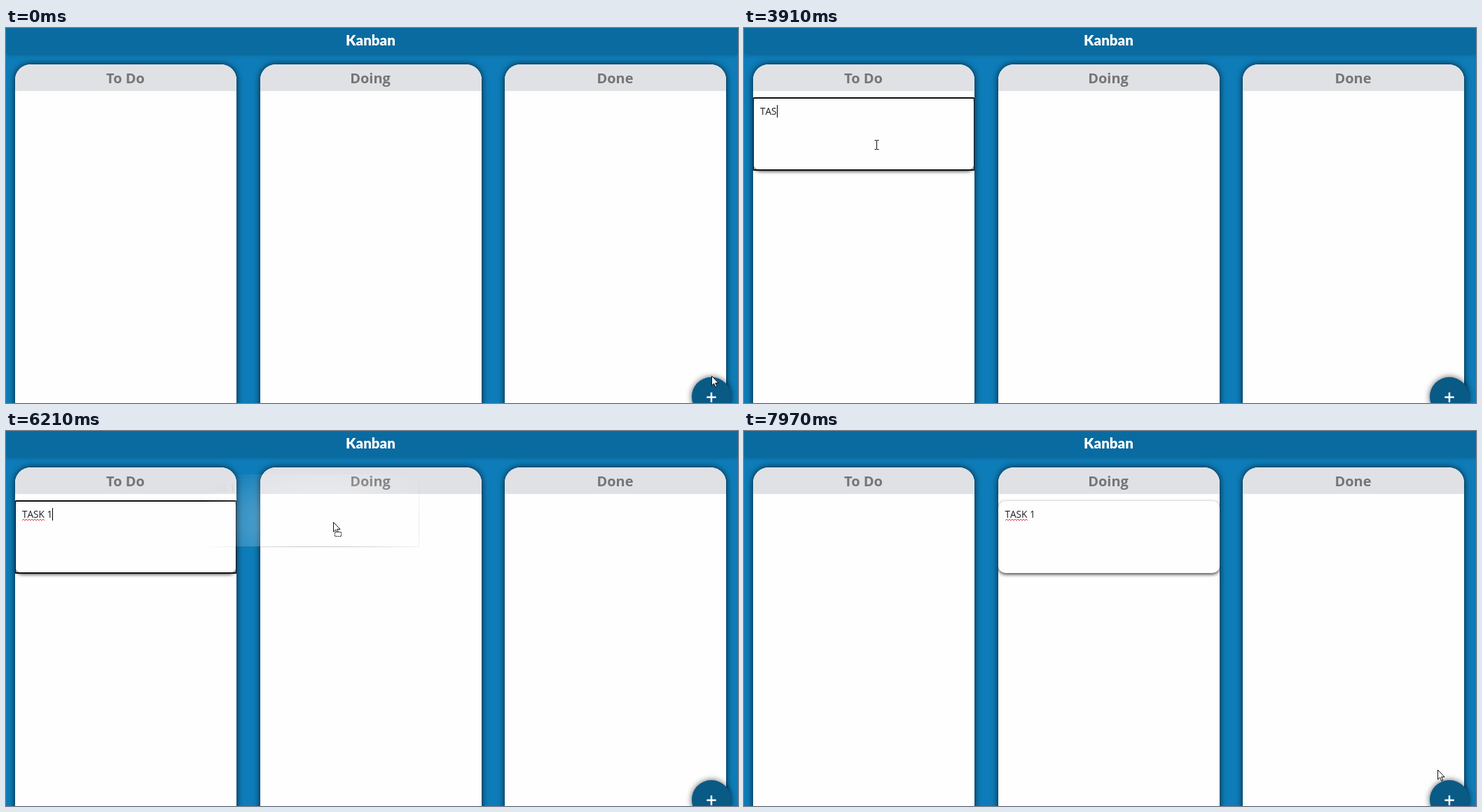
Write an HTML page that moves like this. It is 1045 px wide and 536 px high and loops after 8 s.

```html
<!DOCTYPE html>
<html lang="en">
<head>
<meta charset="utf-8">
<title>Kanban</title>
<style>
html, body { margin: 0; width: 100%; height: 100%; overflow: hidden; background: #0e7cb8; }
body { position: relative; font-family: "Open Sans", "Noto Sans", sans-serif; }
header, section, .card, .add, #ghost, svg { position: absolute; box-sizing: border-box; }
header {
  left: 0; top: 0; width: 1045px; height: 37px; background: #0a6ba0; color: #fff;
  font: 900 20.5px/35px Lato, sans-serif; text-align: center; text-indent: -4px;
  box-shadow: 0 1px 6px rgba(0, 0, 0, .25);
}
section {
  top: 52px; width: 316px; height: 500px; overflow: hidden; background: #fefefe;
  border-radius: 22px 22px 0 0; box-shadow: 0 0 10px rgba(0, 0, 0, .8);
}
h2 {
  margin: 0; height: 38px; background: #e0e1e5; color: #757577;
  font: 700 20px/40px "Open Sans", sans-serif; text-align: center; text-indent: -1px;
}
.card {
  left: 0; top: 48px; width: 100%; height: 103px; background: #fefefe;
  border-radius: 10px; box-shadow: 0 2px 5px rgba(0, 0, 0, .75);
}
.card.focus::after {
  content: ""; position: absolute; inset: -1px; border: 2px solid #101010; border-radius: 3px;
}
p {
  position: absolute; left: 10px; top: 10px; margin: 0; white-space: pre;
  color: #1c1c24; font-size: 13.6px; line-height: 18px; font-kerning: none;
}
p i { position: absolute; top: 0; width: 1px; height: 18px; background: #000; }
.wave { left: 10px; top: 25px; width: 32px; height: 4px; fill: none; stroke: #e0384a; }
.add {
  left: 979px; top: 499px; width: 56px; height: 56px; border-radius: 50%;
  background: #0a5a86; color: #fff; box-shadow: 0 0 8px rgba(0, 0, 0, .65);
  font-size: 28px; font-weight: 600; line-height: 56px; text-align: center;
}
#ghost {
  left: 0; top: 0; width: 316px; height: 104px; background: #fff;
  border: solid #555; border-width: 0 1px 1px 0;
  --fade: radial-gradient(180px 100px at 176px 68px, rgba(0, 0, 0, .5), transparent);
  -webkit-mask-image: var(--fade); mask-image: var(--fade);
}
#cursor { left: 0; top: 0; overflow: visible; width: 1px; height: 1px; fill: #fff; stroke: #111; }
</style>
</head>
<body>
<header>Kanban</header>
<section style="left:13px"><h2>To Do</h2></section>
<section style="left:362.5px"><h2>Doing</h2></section>
<section style="left:712px"><h2>Done</h2></section>
<div class="add">+</div>
<div id="ghost"><p>TASK 1</p></div>
<svg id="cursor">
  <path id="arrow" d="M.5.5v13.6l3.1-3 2.2 5.2 2.1-.9-2.2-5h4.3z"/>
  <path id="hand" d="M-1 1.5q1.5-1.5 3 0v6q1.2-.9 2.4.3 1.3-.6 2.3.5 1.8-.3 2.3 1.2v4l-1.5 3v2h-7v-2l-4-5.5q-.8-1.7.8-1.8l1.7 1.4z"/>
  <path id="beam" fill="none" d="M-3.5-6.5h2.5l.5.5.5-.5h2.5M-.5-6v12M-3.5 6.5h2.5l.5-.5.5.5h2.5"/>
  <rect id="move" x="2.5" y="14.5" width="9" height="6" stroke-dasharray="2 1"/>
  <path id="copy" d="M8.5 15.5h9v9h-9zM11 20h4M13 18v4"/>
</svg>
<script>
const LOOP = 8000, TEXT = 'TASK 1', BLINK = 530;
const ADDED = 1420, FOCUS = 2340, TYPE = 3270, TYPED = 4680;
const GRAB = 5700, DROP = 6510, MOVED = 6600, FADED = 6830;

// Pointer strokes; it rests between them
const origin = { x: 1007, y: 497 };
const strokes = [
  { from: 30, to: 490, x: 1009, y: 513 },
  { from: 1550, to: 1860, x: 440, y: 261 },
  { from: 2000, to: FOCUS, x: 190, y: 167 },
  { from: GRAB - 10, to: 5840, x: 270, y: 128 },
  { from: 5840, to: 6210, x: 467, y: 130 },
  { from: 6210, to: DROP, x: 505, y: 154 },
  { from: MOVED, to: FADED, x: 515, y: 143 },
  { from: 7030, to: 7830, x: 975, y: 452 },
  { from: 7830, to: 7970, x: 990, y: 484 }
];

const $ = id => document.getElementById(id);
const columns = document.querySelectorAll('section');
const clamp = v => Math.max(0, Math.min(1, v));
const show = (el, on) => { el.style.display = on ? '' : 'none'; };
const place = (el, x, y) => {
  el.style.transform = `translate(${Math.round(x)}px,${Math.round(y)}px)`;
};

function makeCard(column) {
  const card = document.createElement('div');
  card.className = 'card';
  card.innerHTML = `<p><span></span><i></i></p>
    <svg class="wave"><path d="M0 3${'l2-2 2 2'.repeat(8)}"/></svg>`;
  column.append(card);
  return (on, text, focus, caret) => {
    show(card, on);
    card.classList.toggle('focus', focus);
    card.querySelector('span').textContent = text;
    show(card.querySelector('i'), caret);
    show(card.querySelector('svg'), text.length > 4);
  };
}
const todo = makeCard(columns[0]), doing = makeCard(columns[1]);

function pointer(t) {
  let { x, y } = origin;
  for (const s of strokes) {
    const u = clamp((t - s.from) / (s.to - s.from));
    x += (s.x - x) * u;
    y += (s.y - y) * u;
  }
  return [x, y];
}

function drawCursor(t) {
  const [x, y] = pointer(t);
  const dragging = t >= GRAB && t < DROP;
  const left = t < MOVED ? 13 : 363;
  const overCard = t >= ADDED && x > left && x < left + 316 && y > 100 && y < 203;
  const hand = Math.hypot(x - 1007, y - 527) < 28;
  const beam = overCard && !dragging;
  place($('cursor'), x, y);
  show($('hand'), hand);
  show($('beam'), beam);
  show($('arrow'), !hand && !beam);
  show($('move'), dragging);
  show($('copy'), dragging && overCard);
}

// The dragged copy trails the pointer slightly and fades once dropped
function drawGhost(t) {
  const [x, y] = pointer(Math.min(t - 33, DROP));
  show($('ghost'), t >= GRAB && t < FADED);
  place($('ghost'), x - 176, y - 68);
  $('ghost').style.opacity = clamp((FADED - t) / (FADED - MOVED));
}

// Typing runs at an even pace, and each key restarts the caret's blink
function typing(t) {
  const pace = (TYPED - TYPE) / (TEXT.length - 1);
  const count = Math.max(0, Math.min(TEXT.length, Math.floor((t - TYPE) / pace) + 1));
  const lastKey = count ? TYPE + (count - 1) * pace : FOCUS;
  const lit = Math.floor((t - lastKey) / BLINK) % 2 === 0;
  return [TEXT.slice(0, count), t >= FOCUS && (lit || t >= GRAB)];
}

function draw(now) {
  const t = now % LOOP;
  const [text, caret] = typing(t);
  todo(t >= ADDED && t < MOVED, text, t >= FOCUS, caret);
  doing(t >= MOVED, TEXT, false, false);
  drawGhost(t);
  drawCursor(t);
}

const start = performance.now();
(function tick() {
  draw(performance.now() - start);
  requestAnimationFrame(tick);
})();
</script>
</body>
</html>
```
